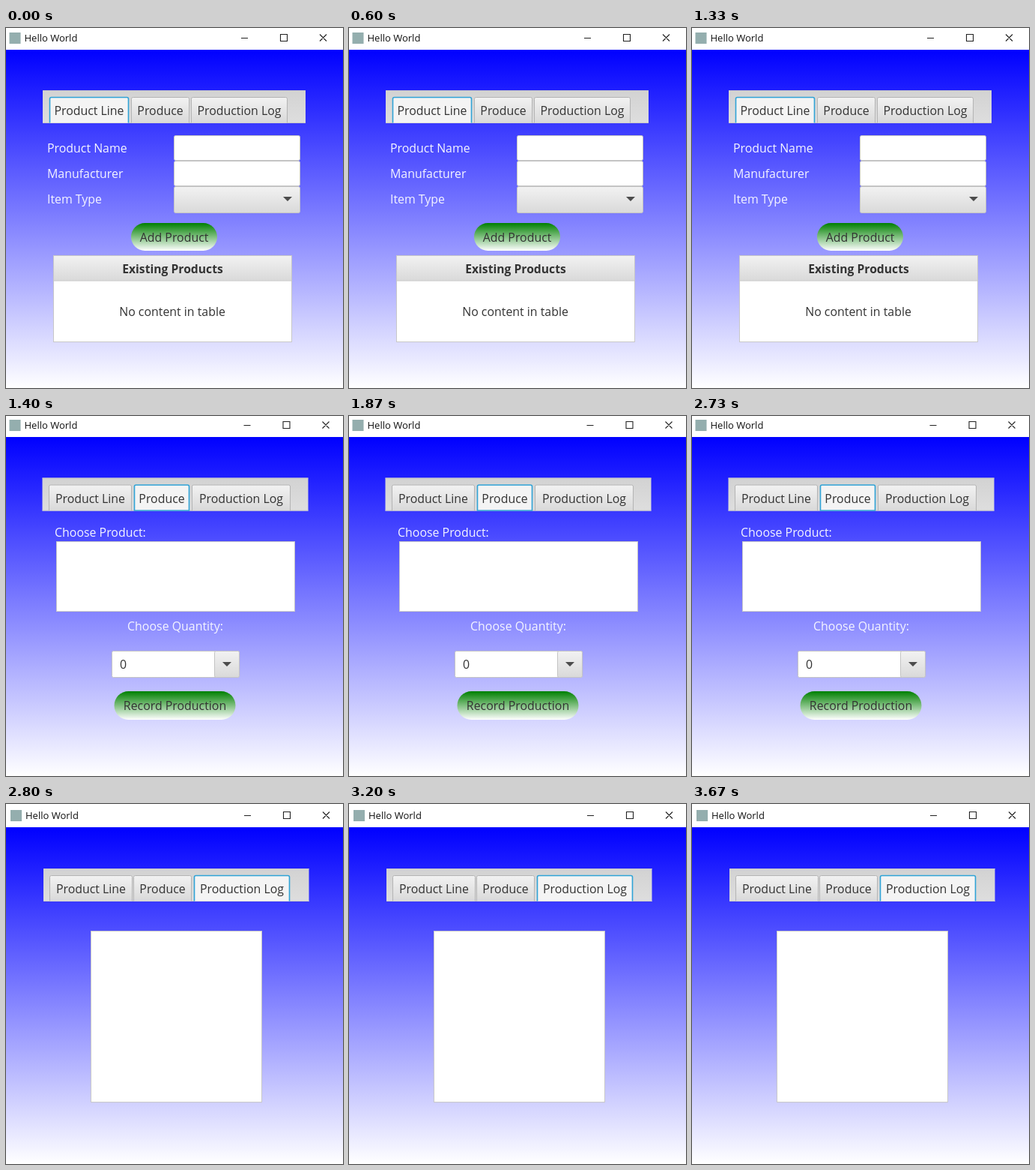
These frames come from a looping animation (450 px wide and 480 px high, 4190 ms). An HTML page:

```html
<!DOCTYPE html>
<html lang="en">
<head>
<meta charset="utf-8">
<title>Hello World</title>
<style>
html, body { margin: 0; width: 100%; height: 100%; overflow: hidden; background: #fff; }
svg { display: block; }
text { font: 15.9px "Open Sans", "Noto Sans", sans-serif; fill: #333; }
.title { font-size: 13px; fill: #111; }
.label { fill: #f4f4ff; }
.bold { font-weight: 700; font-size: 15.7px; }
.mid { text-anchor: middle; }
</style>
</head>
<body>
<svg width="450" height="480" viewBox="0 0 450 480">
  <defs>
    <linearGradient id="sky" x2="0" y2="1"><stop stop-color="#00f"/><stop offset="1" stop-color="#fff"/></linearGradient>
    <linearGradient id="green" x2="0" y2="1"><stop stop-color="#008000"/><stop offset="1" stop-color="#fff"/></linearGradient>
    <linearGradient id="grey" x2="0" y2="1"><stop stop-color="#f2f2f2"/><stop offset="1" stop-color="#d9d9d9"/></linearGradient>
    <linearGradient id="strip" x2="0" y2="1"><stop stop-color="#d2d2d2"/><stop offset="1" stop-color="#dedede"/></linearGradient>
  </defs>
  <g id="stage"></g>
</svg>
<script>
const LOOP = 4190, CUTS = [1400, 2800];
const NAMES = ['Product Line', 'Produce', 'Production Log'];

// Boxes are given by their edges: left, top, right, bottom.
const box = (l, t, r, b, fill, line = 'none', rx = 0) =>
  `<rect x="${l}" y="${t}" width="${r - l}" height="${b - t}" rx="${rx}" fill="${fill}" stroke="${line}"/>`;
const text = (x, y, str, cls = '') => `<text x="${x}" y="${y}" class="${cls}">${str}</text>`;
const field = (l, t, r, b, fill = '#fff') => box(l + .5, t + .5, r - .5, b - .5, fill, '#c4c4c4', 2);
const panel = (l, t, r, b) => box(l + .5, t + .5, r - .5, b - .5, '#fff', '#c8c8c8');
const arrow = (x, y) => `<path d="M${x - 6} ${y - 3}h12l-6 6z" fill="#4c4c4c"/>`;
const button = (l, t, r, b, str) =>
  box(l, t, r, b, 'url(#green)', 'none', (b - t) / 2) + text((l + r) / 2, (t + b) / 2 + 6, str, 'mid');

// Window frame; x and y shift the three control icons.
function frame(bar, tx, x, y) {
  return box(0, 0, 450, 480, '#fff') + box(0, bar, 450, 480, 'url(#sky)') +
    box(tx - 20, y - 7, tx - 5, y + 8, '#94aeae') +
    text(tx, y + 5, 'Hello World', 'title') +
    `<path d="M${x} ${y + .5}h9M${x + 52.5} ${y - 4.5}h9v9h-9zM${x + 105} ${y - 4.5}l9 9m0 -9l-9 9" fill="none" stroke="#222" stroke-width="1.1"/>`;
}

function tabs(l, t, r, edges, active, closed) {
  const b = t + 44, top = t + 9;
  let out = box(l, t, r, b, 'url(#strip)') +
    `<path d="M${l} ${t + .5}H${r}M${l} ${b - .5}H${r}" stroke="#c6c6c6"/>`;
  edges.forEach(([x0, x1], i) => {
    const on = i === active;
    const d = `M${x0 + .5} ${b - .5}V${top + 2.5}q0 -2 2 -2H${x1 - 2.5}q2 0 2 2V${b - .5}`;
    out += `<path d="${d}${on && closed ? 'z' : ''}" fill="${on ? '#f4f4f4' : 'url(#grey)'}" ` +
      `stroke="${on ? '#2fa3d6' : '#b4b4b4'}" stroke-width="${on ? 1.6 : 1}"/>` +
      text((x0 + x1) / 2, t + 33, NAMES[i], 'mid');
  });
  return out;
}

const scenes = [
  frame(29, 24.5, 314, 13) +
    tabs(49, 83, 400, [[58, 164], [167, 245], [247, 376]], 0) +
    text(55, 166, 'Product Name', 'label') +
    text(55, 200, 'Manufacturer', 'label') +
    text(55, 234, 'Item Type', 'label') +
    field(224, 143, 393, 177) + field(224, 177, 393, 211) +
    field(224, 211, 393, 247, 'url(#grey)') + arrow(376, 228) +
    button(167, 260, 282, 297, 'Add Product') +
    panel(63, 303, 382, 419) + box(63.5, 303.5, 381.5, 337, 'url(#grey)', '#c8c8c8') +
    text(222.5, 327, 'Existing Products', 'bold mid') +
    text(222, 384, 'No content in table', 'mid'),

  frame(28, 24.5, 317.5, 12) +
    tabs(48.5, 82.5, 403.5, [[57, 168], [171, 245], [248, 380]], 1, true) +
    text(65, 161, 'Choose Product:', 'label') +
    panel(67, 167, 386, 261) +
    text(226, 286, 'Choose Quantity:', 'label mid') +
    field(141, 313, 312, 349) + field(278, 313, 312, 349, 'url(#grey)') + arrow(295, 331) +
    text(152, 337, '0') +
    button(144.5, 367, 306.5, 405, 'Record Production'),

  frame(31, 26, 318, 15) +
    tabs(50, 86, 404.5, [[58, 169], [170, 248], [251, 379]], 2) +
    panel(113, 169, 342, 398)
];

const stage = document.getElementById('stage');
let shown = -1;
function draw() {
  const t = performance.now() % LOOP;
  const now = CUTS.filter(cut => t >= cut).length;
  if (now !== shown) stage.innerHTML = scenes[shown = now];
  requestAnimationFrame(draw);
}
draw();
</script>
</body>
</html>
```
